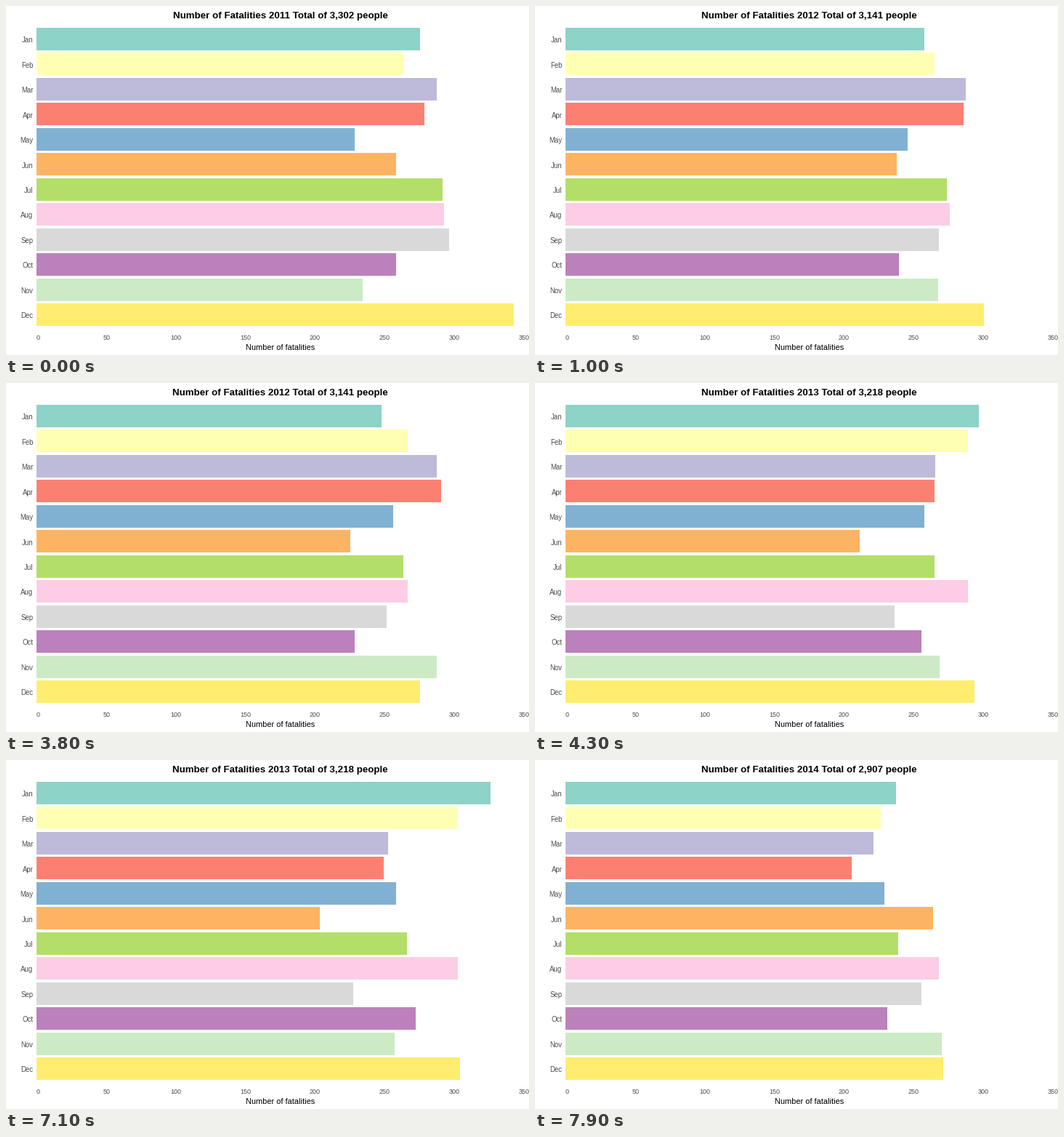
These frames come from a looping animation (720x480 px, 8 s). A matplotlib script:

```python
import math

import matplotlib.pyplot as plt
from matplotlib.animation import FuncAnimation
from matplotlib.patches import Rectangle

W, H, DPI = 720, 480, 100
FRAMES, STEP_MS = 80, 100
START, PERIOD, MOVE = 4, 33, 11    # timing in animation steps

MONTHS = "Jan Feb Mar Apr May Jun Jul Aug Sep Oct Nov Dec".split()
COLORS = plt.get_cmap("Set3").colors
GREY = "#4D4D4D"

# the charted statistics, one key pose per year
FIRST_YEAR = 2011
POSES = [
    [275, 263, 287, 278, 228, 258, 291, 292, 296, 258, 234, 342],
    [247, 266, 287, 290, 256, 225, 263, 266, 251, 228, 287, 275],
    [326, 302, 252, 249, 258, 203, 266, 302, 227, 272, 257, 304],
    [235, 224, 220, 204, 228, 265, 238, 267, 256, 230, 270, 270],
]

LEFT, X0, X_SCALE = 42, 42.15, 1.921
TOP, PITCH, BAR_H = 30, 379 / 11, 31

plt.rcParams["font.family"] = "Liberation Sans"
fig = plt.figure(figsize=(W / DPI, H / DPI), dpi=DPI, facecolor="white")
ax = fig.add_axes([0, 0, 1, 1])
ax.set_xlim(0, W)
ax.set_ylim(H, 0)
ax.axis("off")


def label(x, y, text, px, color="black", ha="center", **kw):
    return ax.text(x, y, text, fontsize=px * 72 / DPI, color=color,
                   ha=ha, va="baseline", **kw)


def x_of(value):
    return X0 + X_SCALE * value


def ease(p):
    """Cubic in-out."""
    return 4 * p ** 3 if p < 0.5 else 1 - 4 * (1 - p) ** 3


bars = []
for k, (month, color) in enumerate(zip(MONTHS, COLORS)):
    y = TOP + PITCH * k
    bars.append(ax.add_patch(Rectangle((LEFT, round(y)), 0, BAR_H, facecolor=color,
                                       linewidth=0, antialiased=False)))
    label(37.5, round(y + 20.3), month, 9.6, GREY, ha="right")

for v in range(0, 351, 50):
    # numbers are right-aligned within a three-character field
    pad = 1.25 * (3 - len(str(v)))
    label(x_of(v) - 0.9 + pad, 459, str(v), 9, GREY)

label(377.5, 473, "Number of fatalities", 11)
title = label(377.8, 17, "", 13.33, weight="bold")


def update(i):
    leg, step = divmod(max(i - START, 0), PERIOD)
    p = min(step / MOVE, 1)
    e = ease(p)
    for bar, a, b in zip(bars, POSES[leg], POSES[leg + 1]):
        bar.set_width(math.floor(x_of(a + (b - a) * e)) - LEFT)
    shown = leg + (p >= 0.5)
    title.set_text(f"Number of Fatalities {FIRST_YEAR + shown} "
                   f"Total of {sum(POSES[shown]):,} people")
    return [*bars, title]


anim = FuncAnimation(fig, update, frames=FRAMES, interval=STEP_MS,
                     repeat=True, repeat_delay=0, blit=False)
plt.show()
```
